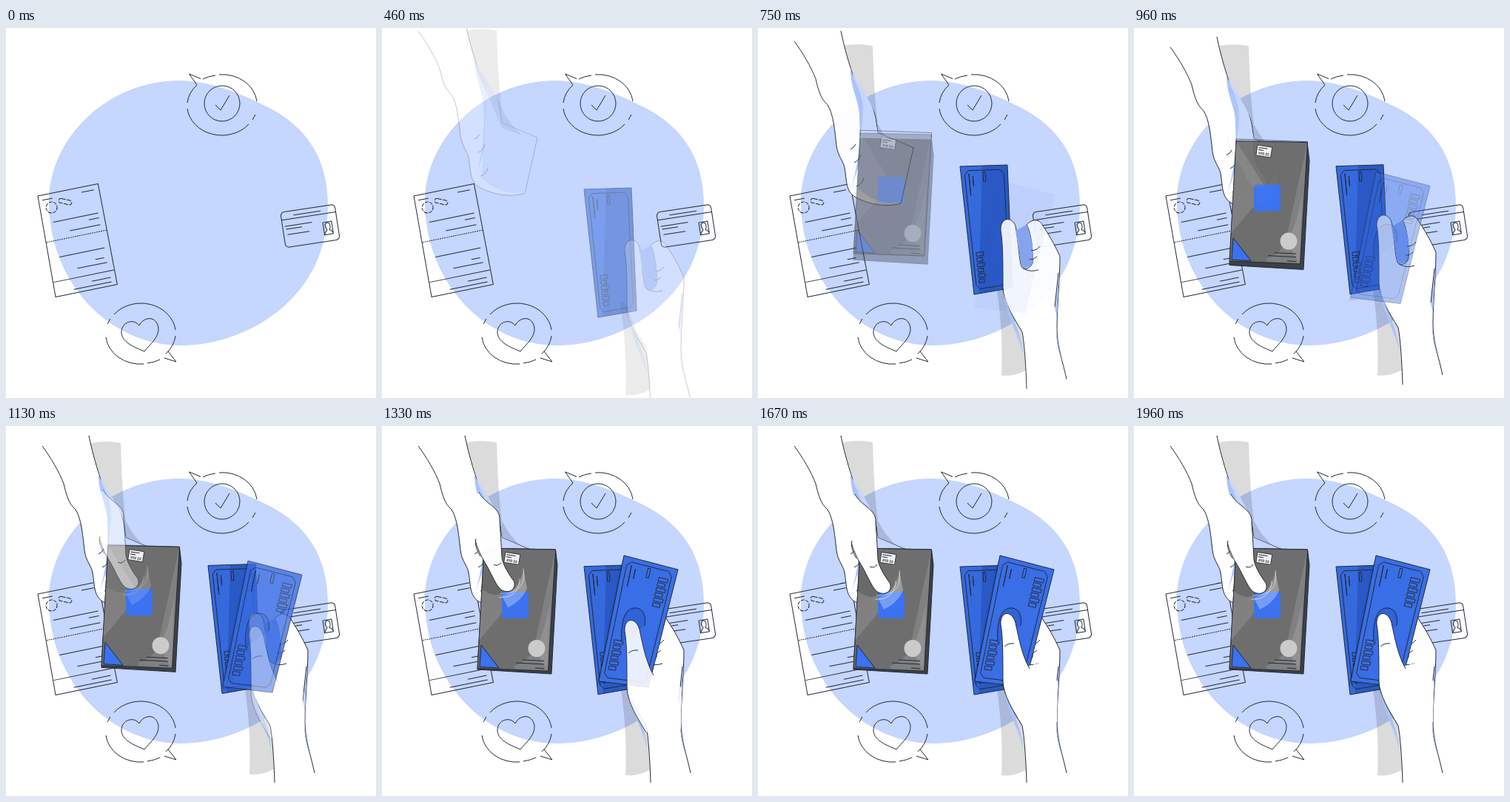
Animation of 500 by 500 pixels, one loop 2 s. Source, as an HTML page:

```html
<!DOCTYPE html>
<html lang="en">
<head>
<meta charset="utf-8">
<title>Unboxing</title>
<style>
html, body { margin: 0; width: 100%; height: 100%; overflow: hidden; background: #fff; }
svg { display: block; width: 100vw; height: 100vh; }
.line { fill: none; stroke: #222a35; stroke-width: 1; stroke-linejoin: round; }
.line.white, .white { fill: #fff; }
.blue { fill: #3b72f0; }
.tint { fill: #a9c3fb; }
.shade { fill: #000; opacity: .14; }
text { font: 700 4.5px Inter, sans-serif; fill: #222; }
</style>
</head>
<body>
<svg viewBox="0 0 500 500">
  <path fill="#c5d6ff" d="M234 71C275 71 316 88 352 106C405 132 435 175 435 240C435 370 320 429 237 429C138 429 58 342 58 235C58 148 138 71 234 71Z"/>

  <g class="line">
    <!-- speech bubbles -->
    <path id="ring" d="M266 69A47 41 0 0 1 283 64M288 63A47 41 0 0 1 339 99M337 117L333 124M328 130A47 41 0 0 1 245 109M245 101A47 41 0 0 1 258 77"/>
    <use href="#ring" transform="rotate(180 237 258.5)"/>
    <path d="M258 77L247.500 62L263 68.500M219 437L230 451L214 446"/>
    <circle cx="292" cy="102" r="24"/>
    <path d="M283 104L290 111L302 91"/>
    <path d="M187 437C172 431 156 424 156 411C156 397 173 392 180 402C186 390 203 388 206 405C207 418 195 427 187 437Z"/>

    <!-- receipt -->
    <g transform="matrix(.98 -.2 .18 .98 43 227)">
      <path d="M0 0H83L84 139H-1ZM0 119H83M5 7h14M76 7h-17M76 39h-62M76 45.500h-14M76 55h-42M76 87h-62M73 100h-12M76 107h-41M77 128h-26M77 134h-52"/>
      <path stroke-dasharray="2 1" d="M0 64H83"/>
      <circle cx="15.500" cy="19" r="7.500" stroke-dasharray="5 1.500"/>
      <rect x="26" y="12" width="18" height="6" rx="3" transform="rotate(24 35 15)" stroke-dasharray="6 1.500"/>
    </g>

    <!-- identity card -->
    <g transform="translate(411 267.500) rotate(-8.700)">
      <rect x="-37" y="-24" width="74" height="48" rx="5"/>
      <path d="M-37 -13.500H37M-20 -18h37M-34 -4.500h37M-33 -.5h22M-32 7h30"/>
      <path d="M17.500 -2h12v17h-12ZM18 14Q20 10 22 9C18 1 21 -1 23.500 -1C27 -1 28 4 25 9Q28 10 29 13"/>
    </g>
  </g>

  <path id="shadowL" class="shade" d="M114 22Q135 18 155 22C156 60 158 100 162 128Q173 150 190 164L162 154L128 75Z"/>
  <path id="shadowR" class="shade" d="M321 345L332 350C338 380 350 395 357 405Q361 440 362 465Q345 474 329 472C331 430 328 385 321 345Z"/>

  <g id="handL">
    <path class="line white" d="M49 27C60 42 72 62 78 78C82 95 85 105 94 113C102 125 104 150 106 168C108 183 115 188 117 198C120 215 118 230 132 238C150 248 175 252 193 246L210 171L162 151C160 140 160 130 156 121C148 105 136 92 128 72C124 60 117 38 112 13"/>
    <path fill="#c5d6ff" d="M127 70Q152 108 156 121L162 151L209 171L192 245Q160 250 134 225L141 150Q143 120 127 70Z"/>
    <path class="tint" d="M125 63C130 85 142 95 142 120L138 190L126 225Q140 180 137 130C138 110 124 90 125 63Z"/>
    <path class="line" d="M125 173Q130 171 132 166M130 191Q137 188 139 180M133 223Q141 220 143 212"/>
  </g>

  <path id="body" class="line" style="fill:#3c4148" d="M138 165L234.500 167L237 188L229 335L129 329Z"/>
  <g id="face">
    <path class="line" style="fill:#6e6e6e" d="M138 165L234.500 167L224.500 331L129 327.500Z"/>
    <path fill="#fff" opacity=".12" d="M138 165L180 232L131 290ZM234 168L205 300L224 331Z"/>
    <path fill="#fff" opacity=".12" d="M178 324C205 318 221 280 227 235L224 331L180 328Z"/>
    <rect class="blue" x="162" y="224" width="36" height="36" rx="4"/>
    <circle cx="209" cy="300.500" r="11.500" fill="#cbcbcb"/>
    <path class="blue" stroke="#222a35" d="M134 296L158 327L132 325.500Z"/>
    <path class="line" d="M190 316l29 1.500M181 320l38 2M207 327l12 1"/>
    <g transform="translate(167 170.500) rotate(9)">
      <rect width="20" height="14" fill="#f2f2f2" stroke="#222a35" stroke-width=".8"/>
      <path class="line" d="M2 3H14M2 6H9"/>
      <text x="3" y="12">010 22</text>
    </g>
  </g>
  <path id="lid" class="line" d="M138 172V164.500L234.500 168V176"/>

  <g id="card1"></g>

  <g id="handR">
    <path class="line white" d="M363 482C362 450 360 420 357 405C345 385 332 365 331 345C331 310 331 285 328 268C327 250 343 248 348 262C352 280 352 305 356 317C362 323 368 318 371 312C372 295 369 270 363 260C372 251 380 253 384 260C392 272 400 285 408 303C408 335 404 370 404 400C404 425 412 445 417 469"/>
    <path fill="#86a4ec" d="M348 268L363 260Q374 285 371 312Q364 321 356 317Z"/>
    <path class="tint" d="M407 322L401 372L404 385ZM403 400Q404 425 411 445Q402 425 403 400M332 350C340 385 354 395 359 438C352 405 336 390 332 350"/>
    <path class="line" d="M406 325L401 371M369 295Q377 295 381 289M367 307Q373 308 377 303M358 319Q368 325 379 321"/>
  </g>

  <g id="card2">
    <path fill="#00195e" opacity=".2" d="M322 190L327 175L300 348L290 350Z"/>
    <g id="print2"></g>
    <path class="line" style="fill:#2f63d8" d="M324 292C322 260 330 246 342 246C354 246 357 258 355 270"/>
  </g>

  <g id="thumbL">
    <path fill="#000" opacity=".18" d="M138 180L134 222Q150 236 164 228Z"/>
    <path fill="#fff" opacity=".3" d="M196 222Q190 238 170 248L162 232Q186 226 191 196Z"/>
    <path fill="none" stroke="#fff" opacity=".55" d="M191 195C194 215 187 229 160 229M186 209C186 225 175 236 158 234"/>
    <path class="white" d="M126 157L112 120L131 92L150 130Z"/>
    <path class="line white" d="M126 157C130 172 136 182 142 192C150 207 156 222 163 225C175 230 182 220 178 212C172 204 163 190 162 180C161 160 160 145 159 130C160 118 150 112 147 109C138 102 134 98 131 92"/>
    <path class="line" d="M133 179C128 170 125 163 127 155M151 190Q157 193 161 187"/>
  </g>

  <g id="thumbR">
    <path class="white" d="M357 405L345 330L378 321L405 345L404 400Z"/>
    <path class="line white" d="M357 405C345 385 332 365 331 345C331 310 331 285 328 268C327 250 343 248 348 266C353 290 357 310 367 328M333 298Q338 293 346 294"/>
  </g>
</svg>
<script>
const byId = id => document.getElementById(id);
const clamp = p => Math.min(1, Math.max(0, p));
const smooth = p => p * p * (3 - 2 * p);

// Draws a printed card inside four corners, with u and v running from 0 to 1
function card(id, fill, [a, b, c, d], columns, shade) {
  const mix = (p, q, k) => p.map((n, i) => n + (q[i] - n) * k);
  const path = pts => 'M' + pts.map(([u, v]) => mix(mix(a, b, u), mix(d, c, u), v)).join('L') + 'Z';
  const box = (u, v, w, h) => path([[u, v], [u + w, v], [u + w, v + h], [u, v + h]]);
  const half = [[.08, .07], [.16, .035], [.84, .035], [.92, .07]];
  const frame = path([...half, ...half.map(([u, v]) => [1 - u, 1 - v])]);
  const marks = box(.17, .06, 0, .17) + box(.25, .08, 0, .08) + box(.47, .05, .05, .075);
  let glyphs = '';
  for (const [u, v] of columns)
    for (let i = 0; i < 6; i++) glyphs += box(u, v + i * .042, i % 2 ? .14 : .17, .028);
  byId(id).innerHTML =
    `<path fill="${fill}" d="${box(0, 0, 1, 1)}"/>
     <path fill="#00195e" opacity=".2" d="${path(shade)}"/>
     <path class="line" d="${box(0, 0, 1, 1) + frame + marks + glyphs}"/>`;
}
card('card1', '#3569de', [[273, 190], [337, 188], [344, 354], [292, 363]], [[.16, .68]],
  [[.47, 0], [1, 0], [1, 1], [.12, 1]]);
card('print2', '#3a6ee6', [[327, 175], [400, 194], [360, 353], [293, 345]], [[.14, .66], [.7, .1]],
  [[0, 1], [1, 1]]);

// Each motion gives [vertical offset, opacity] at a time
const glide = (start, span, dist, gain) => t => {
  const p = clamp((t - start) / span);
  return [dist * (1 - smooth(p)), smooth(clamp(p * gain))];
};
const spring = dist => t => {
  const p = Math.max(0, (t - 290) / 500);
  return [dist * Math.exp(-2.35 * p) * Math.cos(2.05 * p), smooth(clamp(1.5 * p))];
};
const pass = (start, span, dist) => t => {
  const p = clamp((t - start) / span);
  return [dist * (1 - smooth(p)), .7 * Math.sin(Math.PI * p)];
};

const motions = {
  shadowL: spring(-55),
  shadowR: spring(70),
  handL: glide(290, 770, -26, 1.5),
  handR: glide(290, 600, 42, 1.1),
  card1: spring(82),
  body: glide(600, 700, -18, 2),
  face: glide(600, 700, -26, 2),
  lid: pass(600, 700, -30),
  card2: glide(670, 660, 33, 1),
  thumbL: glide(900, 700, -8, 1.5),
  thumbR: glide(960, 700, 20, 1.5)
};
const layers = Object.entries(motions).map(([id, move]) => [byId(id), move]);
const restOpacity = layers.map(([el]) => +getComputedStyle(el).opacity);

function draw() {
  const t = performance.now() % 2000;
  layers.forEach(([el, move], i) => {
    const [y, alpha] = move(t);
    el.setAttribute('transform', `translate(0 ${y})`);
    el.style.opacity = alpha * restOpacity[i];
  });
  requestAnimationFrame(draw);
}
draw();
</script>
</body>
</html>
```
